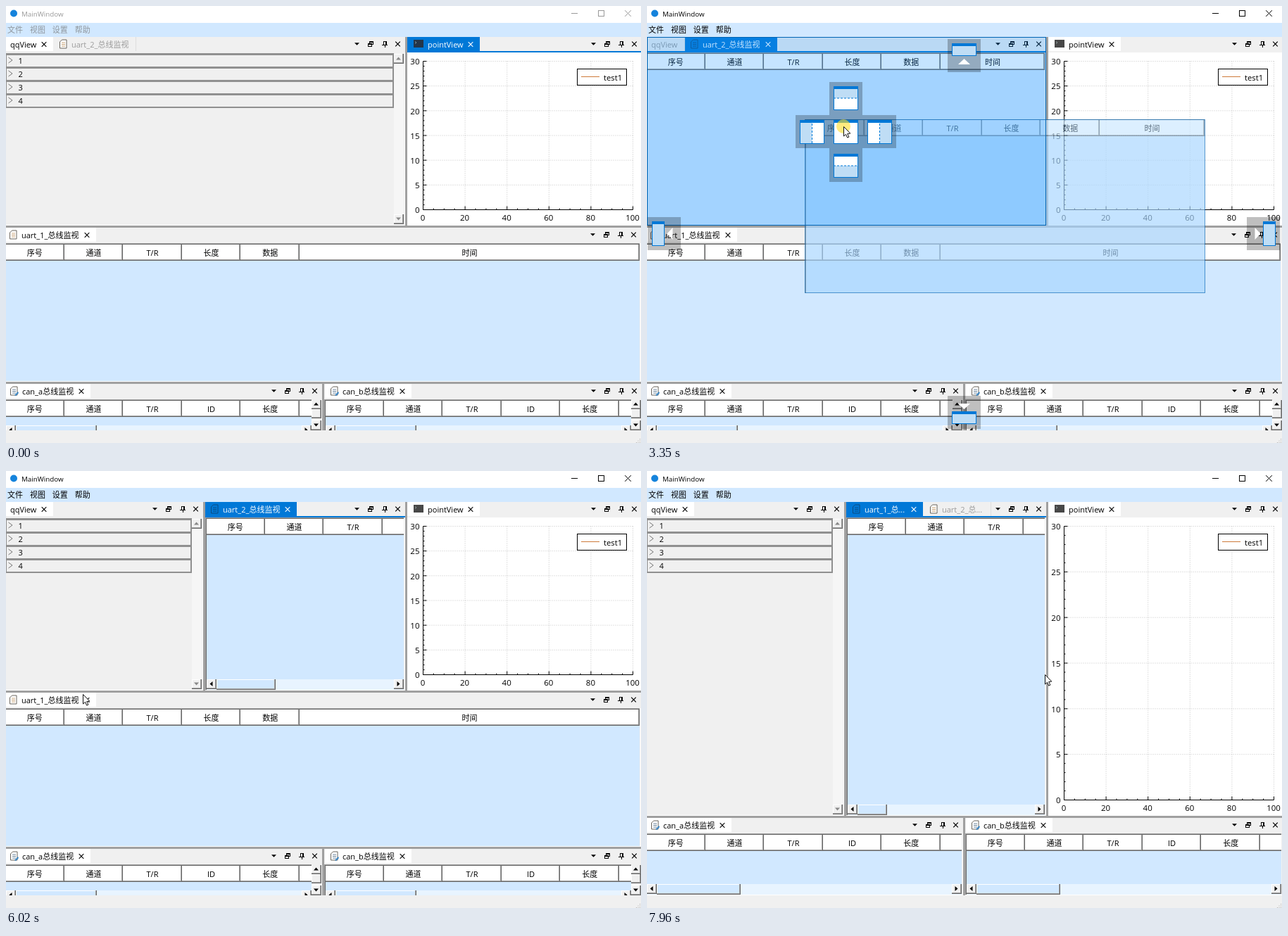
Animation of 902 by 621 pixels, one loop 8000 ms. Source, as an HTML page with a canvas:

```html
<!DOCTYPE html>
<html lang="zh">
<head>
<meta charset="utf-8">
<title>MainWindow</title>
<style>
html, body { margin: 0; width: 100%; height: 100%; overflow: hidden; background: #f0f0f0; }
canvas { display: block; }
</style>
</head>
<body>
<canvas id="stage" width="902" height="621"></canvas>
<script>
const stage = document.getElementById('stage').getContext('2d');
const ghostCanvas = document.createElement('canvas');
ghostCanvas.width = 902;
ghostCanvas.height = 250;
const ghost = ghostCanvas.getContext('2d');
let g = stage;

const FONT = '"Open Sans","Noto Sans CJK SC","Noto Sans CJK",sans-serif';
const BLUE = '#0078d7', PALE = '#d1e8ff', FACE = '#f0f0f0', SPLIT = '#a0a0a0', EDGE = '#696969';
const LOOP = 8000;
const UART = ['序号', '通道', 'T/R', '长度', '数据', '时间'];
const CAN = ['序号', '通道', 'T/R', 'ID', '长度', '数据'];

// Moments of the story
const SHOW = 500, ACTIVATE = 2780, PRESS_2 = 2900, DRAG_2 = 2960, DROP_2 = 4410,
      PRESS_1 = 6090, DRAG_1 = 6230, DROP_1 = 7250;

// Bursts of motion: start, end, steps
const BURSTS = [[500, 710, 4], [900, 1290, 7], [1480, 1870, 7], [2090, 2780, 12], [2900, 3690, 13],
  [3750, 4260, 9], [4410, 5160, 13], [5380, 6170, 13], [6230, 7000, 13], [7060, 7840, 13], [7900, 7960, 2]];

// Pointer path: time, x, y
const PATH = [[500, 692, 592], [710, 481, 495], [900, 462, 499], [965, 444, 490], [1290, 557, 328],
  [1480, 540, 312], [1870, 378, 114], [2090, 340, 124], [2341, 102, 88], [2700, 121, 53],
  [2900, 121, 53], [2966, 160, 70], [3032, 214, 132], [3690, 344, 210], [3877, 340, 194],
  [4260, 329, 184], [4410, 329, 184], [4847, 386, 195], [5160, 372, 222], [5380, 350, 232],
  [6060, 73, 330], [6170, 73, 330], [6230, 200, 300], [6294, 330, 262], [6358, 435, 230],
  [6600, 428, 206], [7000, 424, 183], [7250, 424, 183], [7840, 481, 304], [7900, 530, 296], [7960, 565, 289]];

function snap(t) {
  let q = 0;
  for (const [a, b, n] of BURSTS) {
    if (t < a) break;
    const step = (b - a) / (n - 1);
    q = t >= b ? b : a + Math.floor((t - a) / step + 0.2) * step;
  }
  return q;
}

function pointer(t) {
  let i = 1;
  while (i < PATH.length - 1 && PATH[i][0] < t) i++;
  const [ta, xa, ya] = PATH[i - 1], [tb, xb, yb] = PATH[i];
  const k = Math.min(1, Math.max(0, (t - ta) / (tb - ta)));
  return { x: xa + (xb - xa) * k, y: ya + (yb - ya) * k };
}

// Drawing helpers
function rect(x, y, w, h, c) {
  g.fillStyle = c;
  g.fillRect(x, y, w, h);
}

function frame(x, y, w, h, c) {
  g.strokeStyle = c;
  g.lineWidth = 1;
  g.strokeRect(x + 0.5, y + 0.5, w - 1, h - 1);
}

function trace(pts, close) {
  g.beginPath();
  pts.forEach(([x, y]) => g.lineTo(x, y));
  if (close) g.closePath();
}

function line(pts, c, lw = 1, dash = []) {
  trace(pts);
  g.strokeStyle = c;
  g.lineWidth = lw;
  g.setLineDash(dash);
  g.stroke();
  g.setLineDash([]);
}

function poly(pts, c) {
  trace(pts, true);
  g.fillStyle = c;
  g.fill();
}

function text(s, x, y, c = '#000', align = 'left', size = 11) {
  g.font = size + 'px ' + FONT;
  g.textAlign = align;
  g.fillStyle = c;
  g.fillText(s, x, y + size * 0.37);
}

function clipTo(x, y, w, h, draw) {
  g.save();
  g.beginPath();
  g.rect(x, y, w, h);
  g.clip();
  draw();
  g.restore();
}

function cross(x, y, r, c, lw = 1.1) {
  line([[x - r, y - r], [x + r, y + r]], c, lw);
  line([[x - r, y + r], [x + r, y - r]], c, lw);
}

// dx, dy point to the tip
function arrow(x, y, dx, dy, half, len, c) {
  const bx = x - dx * len / 2, by = y - dy * len / 2;
  poly([[bx + dx * len, by + dy * len], [bx - dy * half, by + dx * half], [bx + dy * half, by - dx * half]], c);
}

// Widgets
function bevel(x, y, w, h, c = FACE) {
  rect(x, y, w, h, EDGE);
  rect(x, y, w - 1, h - 1, SPLIT);
  rect(x, y, w - 2, h - 2, '#fff');
  rect(x + 1, y + 1, w - 3, h - 3, c);
}

function scrollButton(x, y, dx, dy, c = '#000') {
  bevel(x, y, 14, 14);
  arrow(x + 6.5, y + 6.5, dx, dy, 3.5, 4, c);
}

function hScroll(x0, x1, y, thumb) {
  rect(x0, y, x1 - x0, 15, '#e8f4ff');
  scrollButton(x0, y, -1, 0);
  bevel(x0 + 14, y, thumb, 15, PALE);
  scrollButton(x1 - 14, y, 1, 0);
}

// Sunken top and left edge
function sunken(x0, x1, y0, y1) {
  rect(x0 - 2, y0 - 1, x1 - x0 + 2, 1, SPLIT);
  rect(x0 - 2, y0, 1, y1 - y0, SPLIT);
  rect(x0 - 1, y0, x1 - x0 + 1, 1, EDGE);
  rect(x0 - 1, y0, 1, y1 - y0, EDGE);
}

function table(x0, x1, y0, y1, names, stretch) {
  sunken(x0, x1, y0, y1);
  clipTo(x0, y0 + 1, x1 - x0, y1 - y0 - 1, () => {
    rect(x0, y0, x1 - x0, y1 - y0, PALE);
    rect(x0, y0, x1 - x0, 22, '#fff');
    rect(x0, y0 + 22, x1 - x0, 1, SPLIT);
    names.forEach((name, i) => {
      const a = x0 + i * 83.6 - 1;
      const b = stretch && i === names.length - 1 ? x1 : a + 83.6;
      rect(Math.round(b) - 2, y0, 1, 23, SPLIT);
      rect(Math.round(b) - 1, y0, 1, 23, EDGE);
      text(name, (a + b) / 2, y0 + 12.5, '#000', 'center');
    });
    rect(x0, y0 + 23, x1 - x0, 1, EDGE);
  });
}

function docIcon(x, y, kind, focus) {
  if (kind === 'screen') {
    rect(x, y - 6, 14, 11, focus ? '#24364a' : '#484848');
    line([[x + 2, y - 3.5], [x + 4, y - 2], [x + 2, y - 0.5]], '#9aa', 0.8);
    return;
  }
  const c = focus ? '#0b4a80' : '#69645c';
  const pts = [[x + 3.5, y - 6], [x + 10, y - 6], [x + 10, y + 6], [x + 0.5, y + 6], [x + 0.5, y - 3], [x + 3.5, y - 6]];
  if (!focus) poly(pts, '#fff');
  line(pts, c);
  const ink = focus ? c : kind === 'can' ? '#5c7890' : '#c49a68';
  for (const d of [-2, 0.5, 3]) line([[x + 3, y + d], [x + 8, y + d]], ink, 0.9);
  if (kind === 'can') poly([[x + 6, y + 6], [x + 11, y + 1], [x + 12, y + 3], [x + 8, y + 7]], '#3b86c4');
}

function tab(y0, x0, x1, tx, name, kind, state) {
  const focus = state === 'focus', off = state === 'off';
  const ink = focus ? '#fff' : off ? '#9b9b9b' : '#000';
  rect(x0, y0, x1 - x0, 20, focus ? BLUE : off ? FACE : '#fff');
  if (off) rect(x1 - 1, y0, 1, 20, '#dedede');
  if (kind) docIcon(kind === 'screen' ? tx - 20 : tx - 17, y0 + 10, kind, focus);
  text(name, tx, y0 + 11, ink);
  if (!off) cross(x1 - 13, y0 + 10.5, 3.3, ink);
}

function titleButtons(x1, y) {
  arrow(x1 - 68.5, y, 0, 1, 3.5, 3.5, '#000');
  frame(x1 - 51, y - 4, 6, 5, '#000');
  rect(x1 - 51, y - 4, 6, 2, '#000');
  frame(x1 - 53, y - 1, 6, 5, '#000');
  rect(x1 - 53, y - 1, 6, 2, '#000');
  frame(x1 - 31, y - 4, 5, 6, '#000');
  rect(x1 - 28, y - 4, 2, 6, '#000');
  rect(x1 - 33, y + 1, 8, 1, '#000');
  rect(x1 - 29, y + 2, 1, 3, '#000');
  cross(x1 - 10.5, y, 3.3, '#000', 1.2);
}

// tabs: [x0, x1, textX, name, kind, state]
function panel(x0, x1, y0, y1, tabs, content) {
  rect(x0, y0, x1 - x0, y1 - y0, FACE);
  rect(x0, y1 - 1, x1 - x0, 1, '#fff');
  rect(x1 - 1, y0 + 22, 1, y1 - y0 - 22, '#fff');
  tabs.forEach(t => tab(y0, ...t));
  if (tabs.some(t => t[5] === 'focus')) rect(x0, y0 + 20, x1 - x0, 2, BLUE);
  titleButtons(x1, y0 + 10);
  content(x0 ? x0 + 2 : 0, x1 - 2, y0 + 23, y1);
}

function tree(x0, x1, y0, y1) {
  const right = x1 - 15, c = '#909090';
  for (let i = 0; i < 5; i++) rect(x0, y0 + i * 19, right - x0, i < 4 ? 3 : 2, c);
  rect(x0, y0, 1, 77, c);
  rect(right - 1, y0, 2, 78, c);
  for (let i = 0; i < 4; i++) {
    const y = y0 + 10.5 + i * 19;
    line([[x0 + 3.5, y - 4.5], [x0 + 9, y - 0.5], [x0 + 3.5, y + 3.5]], '#777');
    text(i + 1, x0 + 17.5, y + 0.3);
  }
  rect(x1 - 14, y0 + 1, 14, y1 - y0 - 3, '#f6f6f6');
  scrollButton(x1 - 14, y0 + 1, 0, -1, '#888');
  scrollButton(x1 - 14, y1 - 16, 0, 1, '#888');
}

function chart(x0, x1, y0, y1) {
  const L = 592.5, R = 890.5, T = 78.5, B = y1 - 22.5;
  rect(570, y0 - 1, 332, y1 - y0 + 1, '#fff');
  for (let v = 0; v <= 30; v++) {
    const y = B - (B - T) * v / 30, major = v % 5 === 0;
    if (major) {
      if (v) line([[L, y], [R, y]], '#c4c4c4', 1, [1, 2]);
      text(v, 587.5, y + 0.5, '#000', 'right', 11.5);
    }
    line([[L, y], [L + (major ? 5 : 2), y]], '#000');
  }
  for (let v = 0; v <= 100; v += 5) {
    const x = L + (R - L) * v / 100, major = v % 20 === 0;
    if (major) {
      if (v) line([[x, T], [x, B]], '#c4c4c4', 1, [1, 2]);
      text(v, x - 0.5, B + 11, '#000', 'center', 11.5);
    }
    line([[x, B], [x, B - (major ? 5 : 2)]], '#000');
  }
  line([[L, T], [L, B], [R, B]], '#000');
  rect(811, 89, 71, 24, '#fff');
  frame(811, 89, 71, 24, '#000');
  line([[817, 100.5], [843, 100.5]], '#cd7a3a');
  text('test1', 849, 101.5, '#000', 'left', 11.3);
}

const wideTable = (x0, x1, y0, y1) => table(x0, x1, y0, y1 - 1, UART, true);

function narrowTable(thumb) {
  return (x0, x1, y0, y1) => {
    table(x0, x1, y0, y1 - 1, UART);
    hScroll(x0, x1, y1 - 16, thumb);
  };
}

function tallCan(x0, x1, y0, y1) {
  table(x0, x1, y0, y1 - 1, CAN);
  hScroll(x0, x1, y1 - 16, 119);
}

function shortCan(x0, x1, y0, y1) {
  const bar = x1 - 13;
  table(x0, bar, y0, y1, CAN);
  clipTo(x0, y0, x1 + 1 - x0, y1 - y0, () => {
    hScroll(x0, bar, y1 - 7, 115);
    rect(bar, y0, 14, y1 - y0, '#f6f6f6');
    scrollButton(bar, y0 - 1, 0, -1);
    bevel(bar, y0 + 13, 14, 13);
    scrollButton(bar, y0 + 29, 0, 1);
  });
}

function uart1Panel(y0, y1, state) {
  panel(0, 902, y0, y1, [[0, 128, 22, 'uart_1_总线监视', 'uart', state]], wideTable);
}

function titleBar(active, menuActive) {
  const ink = active ? '#000' : '#999';
  rect(0, 0, 902, 24, '#fff');
  g.beginPath();
  g.arc(11, 10.5, 5, 0, 7);
  g.fillStyle = '#1583dc';
  g.fill();
  text('MainWindow', 22, 11, ink, 'left', 9.8);
  rect(803, 10, 9, 1, ink);
  frame(841, 6, 9, 9, ink);
  cross(883.5, 10.5, 4.3, ink, 1);
  rect(0, 24, 902, 20, PALE);
  ['文件', '视图', '设置', '帮助'].forEach((s, i) => text(s, 2 + i * 31.9, 33.5, menuActive ? '#000' : '#8f969c'));
}

function windowView(t) {
  const merged = t >= DROP_1, split = t >= DROP_2;
  const early = t < PRESS_2, onUart1 = t >= PRESS_1;
  const y1 = merged ? 490 : 312, y3 = merged ? 493 : 537;
  const can = merged ? tallCan : shortCan;
  rect(0, 0, 902, 621, FACE);
  titleBar(t >= ACTIVATE, !early);
  rect(0, 44, 902, 559, SPLIT);

  if (!split) {
    panel(0, 567, 44, y1, early
      ? [[0, 67, 6, 'qqView', '', 'current'], [68, 185, 93, 'uart_2_总线监视', 'uart', 'off']]
      : [[0, 54, 6, 'qqView', '', 'off'], [54, 185, 79, 'uart_2_总线监视', 'uart', 'focus']],
      early ? tree : wideTable);
  } else {
    panel(0, 280, 44, y1, [[0, 67, 6, 'qqView', '', 'current']], tree);
    panel(283, 567, 44, y1, merged
      ? [[283, 392, 309, 'uart_1_总...', 'uart', 'focus'], [393, 489, 419, 'uart_2_总...', 'uart', 'off']]
      : [[283, 413, 308, 'uart_2_总线监视', 'uart', onUart1 ? 'current' : 'focus']],
      narrowTable(merged ? 42 : 84));
  }
  panel(570, 903, 44, y1, [[570, 673, 599, 'pointView', 'screen', early ? 'focus' : 'current']], chart);
  if (!merged) uart1Panel(315, 534, onUart1 ? 'focus' : 'current');
  panel(0, 449, y3, 603, [[0, 120, 23, 'can_a总线监视', 'can', 'current']], can);
  panel(452, 903, y3, 603, [[453, 576, 478, 'can_b总线监视', 'can', 'current']], can);

  for (let i = 0; i < 3; i++) {
    for (let j = 0; j <= i; j++) rect(900 - j * 2.5, 615 + i * 2.5, 1, 1, '#b0b0b0');
  }
}

// Drop helpers
function miniWindow(x, y, w, h, dx, dy, full) {
  rect(x, y, w, h, full ? '#bfddf5' : '#fff');
  if (dx || dy) {
    const mx = x + w / 2, my = y + h / 2;
    if (dx) rect(dx < 0 ? x : mx, y, w / 2, h, '#bfddf5');
    else rect(x, dy < 0 ? y : my, w, h / 2, '#bfddf5');
    line(dx ? [[mx, y], [mx, y + h]] : [[x, my], [x + w, my]], BLUE, 1, [3, 2]);
  }
  frame(x, y, w, h, BLUE);
  rect(x, y, w, 4, BLUE);
}

function edgeMarkers() {
  const shade = 'rgba(0,0,0,.25)';
  [[427, 47, 0, -1], [427, 554, 0, 1], [1, 300, -1, 0], [852, 300, 1, 0]].forEach(([x, y, dx, dy]) => {
    rect(x, y, 47, 47, shade);
    const w = dx ? 18 : 35, h = dy ? 18 : 35;
    miniWindow(x + (dx > 0 ? 23 : 6), y + (dy > 0 ? 22 : 6), w, h, 0, 0, true);
    arrow(x + 23.5 - dx * 8, y + 23.5 - dy * 8.5, dx, dy, 8.5, 8, '#fff');
  });
}

const SIDES = [[0, 0], [0, -1], [0, 1], [-1, 0], [1, 0]];

function areaAt(p, split) {
  const [x0, x1, cx] = !split ? [0, 567, 282] : p.x < 282 ? [0, 280, 139] : [284, 567, 425];
  return { x0, x1, cx, cy: 179 };
}

function preview(p, a) {
  const hit = SIDES.find(([dx, dy]) => Math.abs(p.x - a.cx - dx * 47.5) < 23.7 && Math.abs(p.y - a.cy - dy * 47.5) < 23.7);
  if (!hit) return;
  const [dx, dy] = hit, w = a.x1 - a.x0, h = 268;
  const x = dx > 0 ? a.cx : a.x0, y = dy > 0 ? 178 : 44;
  const pw = dx > 0 ? a.x1 - a.cx : dx ? w / 2 : w, ph = dy ? h / 2 : h;
  rect(x, y, pw, ph, 'rgba(24,148,255,.25)');
  frame(x, y, pw, ph, '#0064b3');
}

function crossMarkers(a) {
  const x = a.cx - 23, y = a.cy - 24, shade = 'rgba(0,0,0,.25)';
  rect(x, y - 47, 47, 142, shade);
  rect(x - 48, y, 48, 47, shade);
  rect(x + 47, y, 48, 47, shade);
  SIDES.forEach(([dx, dy]) => miniWindow(x + 6 + dx * 48, y + 7 + dy * 48, 35, 34, dx, dy));
}

function floating(x, y, w, h, draw) {
  x = Math.round(x);
  y = Math.round(y);
  ghost.clearRect(0, 0, 902, 250);
  g = ghost;
  draw();
  g = stage;
  g.globalAlpha = 0.6;
  g.drawImage(ghostCanvas, 0, 0, w, h, x, y, w, h);
  g.globalAlpha = 1;
  rect(x, y, w, h, 'rgba(24,148,255,.15)');
  frame(x, y, w, h, 'rgba(0,96,172,.6)');
}

function drawCursor(p, pressed) {
  const x = Math.round(p.x), y = Math.round(p.y);
  if (pressed) {
    g.beginPath();
    g.arc(x, y, 10, 0, 7);
    g.fillStyle = 'rgba(255,222,40,.6)';
    g.fill();
  }
  const pts = [[0, 0], [0, 13.5], [3, 10.8], [5.2, 15.6], [7.4, 14.6], [5.2, 10], [9.3, 9.6], [0, 0]]
    .map(([a, b]) => [x + 0.5 + a, y + 0.5 + b]);
  poly(pts, '#fff');
  line(pts, '#111');
}

function render(t) {
  const q = snap(t), p = pointer(q);
  windowView(t);
  const drag2 = t >= DRAG_2 && t < DROP_2, drag1 = t >= DRAG_1 && t < DROP_1;
  if (drag1 || drag2) {
    const a = areaAt(p, drag1), lag = pointer(q - 11);
    if (drag2) floating(lag.x - 53, lag.y - 8.5, 569, 247, () => table(2, 568, 0, 247, UART, true));
    else floating(lag.x - 73, lag.y - 14.5, 902, 218, () => uart1Panel(0, 218, 'focus'));
    preview(p, a);
    edgeMarkers();
    crossMarkers(a);
  }
  if (t >= SHOW) drawCursor(p, (t >= ACTIVATE && t < DROP_2) || (t >= PRESS_1 && t < DROP_1));
}

const begin = performance.now();
function tick() {
  render((performance.now() - begin) % LOOP);
  requestAnimationFrame(tick);
}
tick();
</script>
</body>
</html>
```
